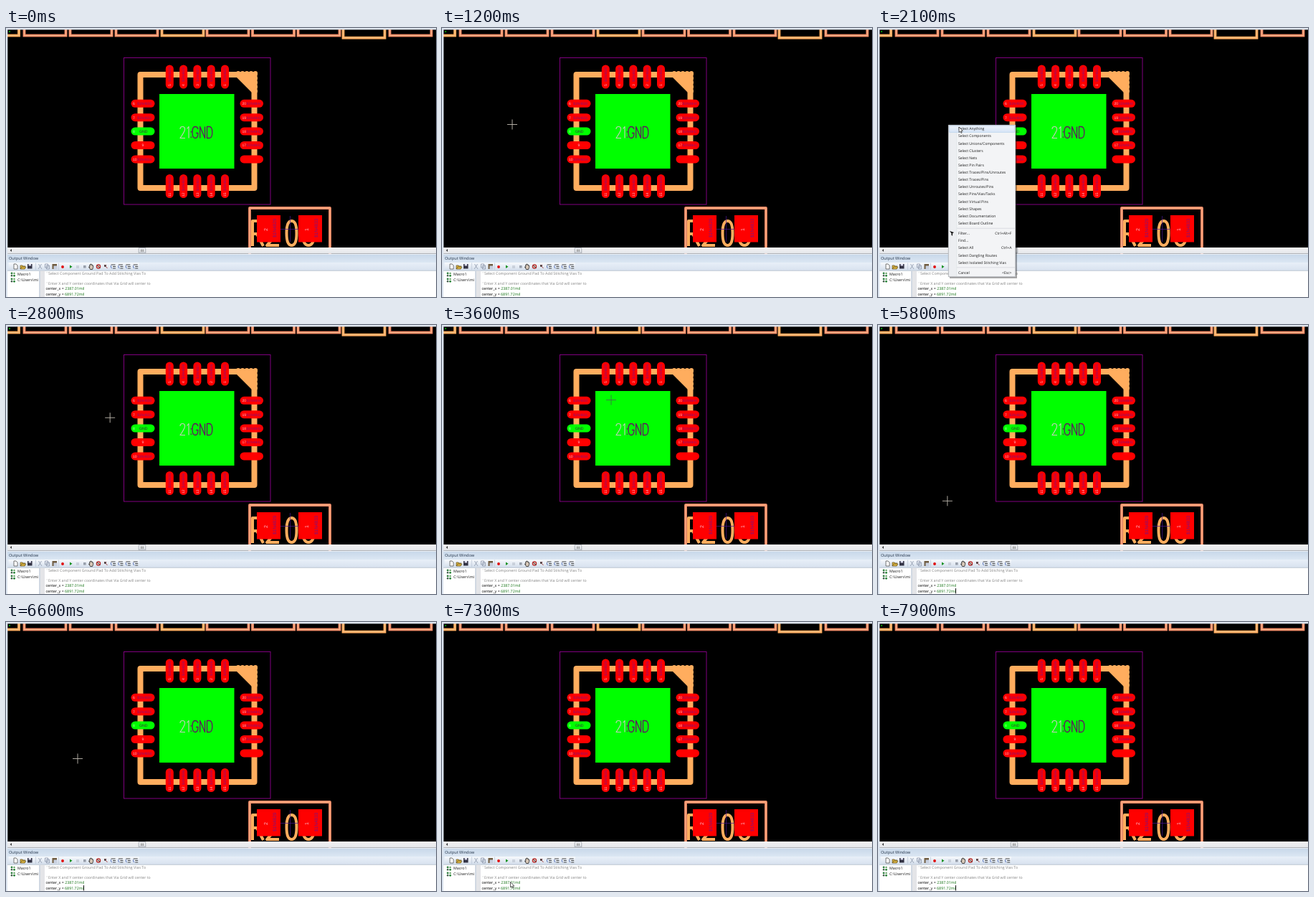
These frames come from a looping animation (600x375 px, 8 s). An HTML page with a canvas:

```html
<!DOCTYPE html>
<html lang="en">
<head>
<meta charset="utf-8">
<title>Stitching via macro</title>
<style>
html, body { margin: 0; width: 100%; height: 100%; overflow: hidden; background: #000; }
canvas { display: block; width: 600px; height: 375px; }
</style>
</head>
<body>
<canvas id="stage" width="600" height="375"></canvas>
<script>
const g = document.getElementById('stage').getContext('2d');
const LOOP = 8000;
const ORANGE = '#ffad5e', SALMON = '#f58c6a', RED = '#ff0000', GREEN = '#00ff00', PURPLE = '#800080';
const NET = '#80107c', PIN = '#ffb8c8';
const UI = '"Open Sans", "Noto Sans", sans-serif', CAD = '"Liberation Sans", Arial, sans-serif';

// Cursor stops: time, x, y
const STOPS = [
  [600, 90, 382], [1100, 98, 134.5], [1750, 98, 134.5], [2000, 113, 138],
  [2600, 113, 138], [3200, 236, 104.5], [3900, 236, 104.5], [4600, 92, 330.5],
  [5400, 92, 330.5], [6100, 100, 190.5], [6900, 100, 190.5], [7400, 95, 382]
];
const MENU = [1700, 2600];
const GROUPS = [
  ['Select Anything', 'Select Components', 'Select Unions/Components', 'Select Clusters',
   'Select Nets', 'Select Pin Pairs', 'Select Traces/Pins/Unroutes', 'Select Traces/Pins',
   'Select Unroutes/Pins', 'Select Pins/Vias/Tacks', 'Select Virtual Pins', 'Select Shapes',
   'Select Documentation', 'Select Board Outline'],
  ['Filter...', 'Find...', 'Select All', 'Select Dangling Routes', 'Select Isolated Stitching Vias'],
  ['Cancel']
];
const KEYS = { 'Filter...': 'Ctrl+Alt+F', 'Select All': 'Ctrl+A', 'Cancel': '<Esc>' };

function box(x, y, w, h, color) {
  g.fillStyle = color;
  g.fillRect(x, y, w, h);
}
function frame(x, y, w, h, color, width = 1) {
  g.strokeStyle = color;
  g.lineWidth = width;
  g.strokeRect(x, y, w, h);
}
function line(d, color, width = 1) {
  g.strokeStyle = color;
  g.lineWidth = width;
  g.stroke(new Path2D(d));
}
function shape(d, color) {
  g.fillStyle = color;
  g.fill(new Path2D(d));
}
function dot(x, y, r, color) {
  g.fillStyle = color;
  g.beginPath();
  g.arc(x, y, r, 0, 7);
  g.fill();
}
function text(s, x, y, color, size = 5.1, font = UI, align = 'left') {
  g.font = `${size}px ${font}`;
  g.textAlign = align;
  g.fillStyle = color;
  g.fillText(s, x, y);
}
function upText(s, x, y, color, size) {
  g.save();
  g.translate(x, y);
  g.rotate(-Math.PI / 2);
  text(s, 0, 0, color, size, CAD);
  g.restore();
}
function fade(x, y, w, h, top, bottom) {
  const f = g.createLinearGradient(0, y, 0, y + h);
  f.addColorStop(0, top);
  f.addColorStop(1, bottom);
  box(x, y, w, h, f);
}
function pill(x, y, w, h, color) {
  g.fillStyle = color;
  g.beginPath();
  g.roundRect(x, y, w, h, Math.min(w, h) / 2);
  g.fill();
}
function outline(x, y, w, h, color) {
  frame(x, y, w, h, color, 3.8);
  frame(x, y, w, h, '#ffc090', 0.8);
}

function board() {
  box(0, 0, 600, 375, '#000');
  [-40, 25.5, 89.5, 153.5, 217.5, 280.5, 344, 407.5, 470.5, 535.5].forEach((x, i) =>
    outline(x, -20, 58, i === 8 ? 33.7 : 30.5, i % 4 ? SALMON : ORANGE));
  dot(5, 5, 1, '#00c000');

  frame(164.5, 41.5, 204.5, 204.5, PURPLE);
  g.lineJoin = 'round';
  frame(187.5, 65, 159, 158, ORANGE, 8);
  shape('M315 62H350V97Z', ORANGE);
  for (let i = 0; i < 5; i++) {
    dot(324 + i * 6, 63, 3, ORANGE);
    dot(348, 64 + i * 6, 3, ORANGE);
  }
  box(214, 92, 104.5, 104, GREEN);

  for (let i = 0; i < 5; i++) {
    const x = 228.3 + i * 19.3, y = 105.3 + i * 19.4;
    pill(x - 5.5, 51.5, 11, 33, RED);
    upText(String(5 - i), x + 1.8, 81, PIN, 5);
    upText('$1N48' + (29 - i), x + 1.8, 75, NET, 5);
    pill(x - 5.5, 204, 11, 33, RED);
    upText(String(11 + i), x + 1.8, 235, PIN, 5);
    upText('$1N48' + (35 + i), x + 1.8, 227, NET, 5);

    const ground = i === 2;
    pill(174.5, y - 5.5, 33, 11, ground ? GREEN : RED);
    text(String(6 + i), i === 3 ? 189.5 : 177, y + 1.8, ground ? '#b0ffb0' : PIN, 5, CAD);
    if (ground) text('GND', 186, y + 1.9, '#402040', 5.2, CAD);
    else if (i !== 3) text('$1N48' + (30 + i), 183, y + 1.8, NET, 5, CAD);
    pill(326.5, y - 5.5, 32.5, 11, RED);
    if (i < 4) {
      text(String(20 - i), 329.5, y + 1.8, PIN, 5, CAD);
      text('$1N48' + (44 - i), 335.5, y + 1.8, NET, 5, CAD);
    }
  }

  // Plotter lettering on the ground pad
  line('M243 141Q243 137.5 246.3 137.5T249.6 141Q249.6 144 243 153.5H250M252.5 140.5L255 137.5V153.5',
    '#c8ccc0', 1.1);
  line('M258.5 144v1.5M258.5 151.5v1.5M268 141Q267 137.5 264 137.5Q260 137.5 260 145.5T264 153.5Q268 153.5 268 146.5H265' +
    'M270.7 153.5V137.5L277.5 153.5V137.5M280.5 137.5V153.5H283.5Q287.8 153.5 287.8 145.5T283.5 137.5Z',
    '#621662', 1.3);

  // Neighbouring part
  outline(340, 251, 112, 80, SALMON);
  line('M344 304V269H350Q358 269 358 278T350 287H344M350 287L359 304' +
    'M364 277Q364 269 372 269T380 278Q380 286 364 303H381' +
    'M398.5 269Q391.5 269 391.5 286T398.5 303T405.5 286T398.5 269' +
    'M422 269Q414 269 414 286T422 303T430 286T422 269', ORANGE, 4);
  box(350, 261, 33, 37.5, RED);
  box(408, 261, 33, 37.5, RED);
  line('M396.5 262V298M383 280.5H408', '#4a1890', 0.7);
  upText('2', 364.5, 283, PIN, 7);
  upText('1', 422, 283, PIN, 7);
  upText('$1N4829', 377, 292, NET, 6.5);
  upText('$1N4833', 435, 292, NET, 6.5);
}

function toolbar(hover) {
  fade(2, 327, 598, 11, '#e8eff8', '#d8e2ef');
  fade(4, 327, 182, 11, '#f8fafd', '#d2ddeb');
  if (hover) {
    box(83, 327.5, 11, 10, '#cfe4d8');
    frame(83.5, 327.5, 10, 9.5, '#7090b0', 0.8);
  }
  shape('M11 329h3l2 2v5h-5z', '#fff');
  line('M11 329h3l2 2v5h-5z', '#555', 0.8);
  shape('M20 331h3l1 1h3v4h-7z', '#e0b840');
  line('M20 336v-5h3l1 1h3M20 336l2-3h6l-2 3z', '#5a4a20', 0.7);
  box(30, 329, 6.5, 6.5, '#334');
  box(31.5, 329, 3.5, 2.5, '#dde');
  line('M41.5 327.5v9.5M73.5 327.5v9.5', '#b4c0d0', 0.6);
  line('M45.5 329l3 5M49.5 329l-3 5M45 336l1.5-2M50 336l-1.5-2', '#8894a8', 0.8);
  frame(54.5, 329, 4, 5, '#8894a8', 0.8);
  frame(56.5, 331, 4, 5, '#8894a8', 0.8);
  box(64.5, 329, 6.5, 7, '#705c40');
  box(66.5, 331.5, 5, 5, '#c8d0e0');
  dot(79, 333, 1.9, '#e00000');
  shape('M89 330.5l3.5 2.3-3.5 2.3z', '#109020');
  box(98.5, 331, 1, 4, '#b0b8c4');
  box(100.5, 331, 1, 4, '#b0b8c4');
  box(108, 331, 3.6, 3.6, '#98a0ac');
  const hand = 'M115.5 333l1.2.6v-3.4h1.2v-1h1.2v1h1.5v1h1v2.5l-1 2.8h-3z';
  shape(hand, '#d8c8b8');
  line(hand, '#222', 0.8);
  dot(129, 332.5, 3.2, '#b82828');
  dot(129, 332.5, 2, '#e8c8c0');
  line('M127.5 331l3.5 3.5', '#222', 1);
  line('M137 330l4.5 5M140 330l-2.5 3', '#a03030', 0.9);
  dot(138.3, 331.5, 1.3, '#333');
  for (let i = 0; i < 4; i++) {
    const x = 146.5 + i * 10.4;
    line(`M${x} 330h6M${x + 2.5} 332.5h4M${x + 2.5} 335h4`, '#333', 0.9);
    line(`M${x} 331v3l1.5 1`, '#4060b0', 0.8);
  }
}

function output(t) {
  box(0, 0, 600, 2.4, '#dde3ec');
  box(0, 0, 2.3, 375, '#dce5f0');
  fade(2, 306, 598, 8.5, '#f4f4f5', '#e4e6ea');
  shape('M8 308v4l-2.5-2z', '#444');
  fade(185, 306.5, 10, 7.5, '#fafafa', '#d0d4da');
  frame(185.2, 306.7, 9.6, 7.1, '#979ca5', 0.7);
  line('M188.5 308.5v3.5M190 308.5v3.5M191.5 308.5v3.5', '#666', 0.6);
  box(2, 314.5, 598, 2, '#eaf0f7');
  fade(2, 316, 598, 11, '#c8d8ea', '#dce7f3');
  text('Output Window', 4, 323.3, '#26364c', 5.6);
  toolbar(t > 4550 && t < 5450);

  box(2, 338, 598, 37, '#fff');
  line('M2 338.3H600', '#a4b0c0', 0.7);
  box(46, 338, 2, 37, '#d0d8e2');
  box(48, 338.7, 6, 37, '#e4e5e8');
  [343.5, 351.5].forEach(y => {
    dot(8, y - 1.5, 1.4, '#308040');
    dot(11.5, y - 1.5, 1.2, '#60a060');
    dot(8, y + 1.8, 1.3, '#405848');
    dot(11.5, y + 1.8, 1.4, '#208030');
  });
  g.save();
  g.beginPath();
  g.rect(4, 338, 41, 37);
  g.clip();
  text('Macro1', 16, 345.2, '#111', 5.3);
  text('C:\\Users\\mil', 16, 353.4, '#111', 5.3);
  g.restore();

  text("' Select Component Ground Pad To Add Stitching Vias To", 56.5, 344.4, '#808080', 5.32);
  text("' Enter X and Y center coordinates that Via Grid will center to", 56.5, 358.2, '#808080', 5.2);
  [['center_x = ', '2387.01mil', 365.4], ['center_y = ', '6891.72mil', 372.6]].forEach(([name, value, y]) => {
    text(name, 55.5, y, '#000', 5.3);
    text(value, 55.5 + g.measureText(name).width, y, '#107010', 5.3);
  });
  if (t >= 5440 && (t - 5440) % 1060 < 530) box(108, 367, 0.9, 7.5, '#000');
}

function menu() {
  box(100, 137, 94, 212, 'rgba(0,0,0,.35)');
  box(98, 135, 94, 212, '#f3f4f6');
  box(98.5, 135.5, 11, 211, '#eceef1');
  line('M109.7 136V346', '#dfe2e7', 0.7);
  frame(98.3, 135.3, 93.4, 211.4, '#9a9da3', 0.7);
  fade(99.5, 136.2, 91, 9.2, '#eef3fb', '#d6e4f6');
  frame(99.5, 136.2, 91, 9.2, '#aecbe9', 0.6);
  let y = 142.3;
  GROUPS.forEach((items, i) => {
    if (i) {
      line(`M110 ${y - 4.9}H191`, '#cfd2d8', 0.7);
      y += 4;
    }
    items.forEach(item => {
      text(item, 112, y, '#1a1a1a');
      if (KEYS[item]) text(KEYS[item], 186.5, y, '#1a1a1a', 5.1, UI, 'right');
      y += 10.13;
    });
  });
  shape('M100 283l6 2-2 1.2v3.5l-1.5-1v-2.5z', '#111');
}

function cursor(t, open) {
  const i = STOPS.findIndex(s => s[0] > t);
  if (i < 1) return;
  const [t0, x0, y0] = STOPS[i - 1], [t1, x1, y1] = STOPS[i];
  const p = (t - t0) / (t1 - t0), e = p * p * (3 - 2 * p);
  const x = x0 + (x1 - x0) * e, y = y0 + (y1 - y0) * e;
  if (!open && y < 306) {
    const onPad = x > 214 && x < 318 && y > 92 && y < 196;
    line(`M${x - 7} ${y}h14M${x} ${y - 7}v14`, onPad ? '#3f7048' : '#c0bab0', 0.9);
    return;
  }
  g.save();
  g.translate(x, y);
  const arrow = 'M0 0V7.5L1.8 6L3 8.5L4.2 8L3 5.5H5.3Z';
  shape(arrow, '#fff');
  line(arrow, '#222', 0.7);
  g.restore();
}

function draw(now) {
  const t = now % LOOP, open = t >= MENU[0] && t < MENU[1];
  g.textRendering = 'geometricPrecision';
  g.lineJoin = 'miter';
  board();
  output(t);
  if (open) menu();
  cursor(t, open);
  requestAnimationFrame(draw);
}
requestAnimationFrame(draw);
</script>
</body>
</html>
```
